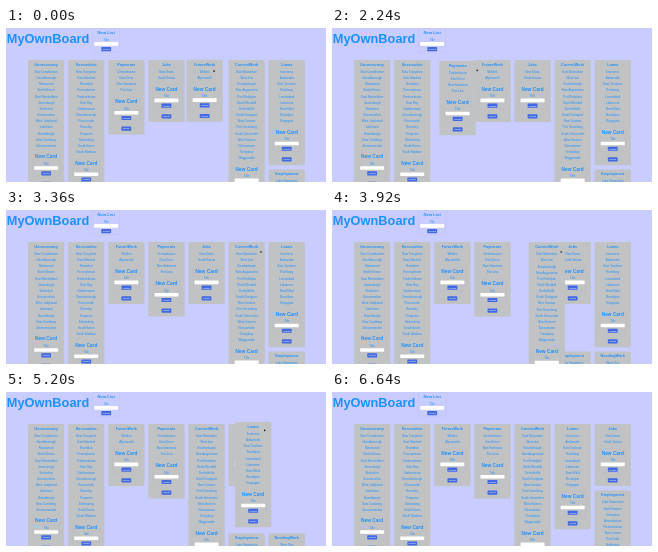
An HTML page with a canvas that plays this animation: 320 px wide and 154 px high, repeating every 8240 ms.

```html
<!DOCTYPE html>
<html lang="en">
<head>
<meta charset="utf-8">
<title>Board</title>
<style>
html, body { margin: 0; width: 100%; height: 100%; overflow: hidden; background: #c8ccff; }
canvas { display: block; width: 100vw; height: 100vh; }
</style>
</head>
<body>
<canvas id="stage"></canvas>
<script>
const W = 320, H = 154, LOOP = 8240, STEP = 80;
const PAGE = '#c8ccff', BLUE = '#1e90ff', GREY = '#c1c2c3', BUTTON = '#4169e1';
const EDGE = 'rgba(182, 186, 205, 0.6)';
const COLS = 7, LEFT = 22, TOP = 32, PITCH = 40.1, LIST_W = 36.3, GAP = 4.3, ROW = 6.15;

const canvas = document.getElementById('stage');
const ctx = canvas.getContext('2d');

const lists = {
  Unnecessary: 'New Constbottom,Haroldborough,Mariewood,North Elmore,East Reinholdton,Jamesburgh,Stokesfort,Uricastershire,West Judykstad,Lakehurst,Brandtburgh,New Carolberg,Zimmermanfurt',
  Necessities: 'New Tracyshire,East Manfred,Rositafurt,Feeneyhaven,Fredericktown,New Ray,Gaitherstown,Dessieborough,Roscoeside,Boverley,Tempeton,Stokesberg,South Karen,South Madison',
  Payments: 'Cristianhaven,East Deon,New Swintonia,Port Lisa',
  Jobs: 'New Dasia,South Karina',
  FutureWork: 'Weldon,Alyceworth',
  CurrentWork: 'East Marionburi,West Isai,Eusebioburgh,New Augustview,Port Rodolpho,North Wendall,Gerholdville,South Dustyport,New Gustave,Port Greenberg,South Vernicefort,West Kareem,Nienowtown,Trinitybury,Waggonside',
  Loans: 'Inverness,Amberside,East Torshavn,Rochberg,Lavinialand,Lakemore,New Kilkid,Brooklynn,Kingsgate',
  Employment: 'Lake Nasarstein,East Grayson,Johnnyton,Amandashire,Frederichaven,New Lenora,Port Estel,Hallieview,Marksbury',
  NeedingWork: 'West Orin,Kaydenport,Lake Elsa,Ricoton'
};
for (const name in lists) lists[name] = lists[name].split(',');

// Each drag: grab point inside the list, and the moment it takes its new slot.
const drags = [
  { name: 'FutureWork', from: 0, swap: 1040, to: 1760, ox: 27, oy: 10, slot: 3 },
  { name: 'Payments', from: 2160, swap: 2480, to: 2880, ox: 37.2, oy: 8.2, slot: 3 },
  { name: 'CurrentWork', from: 3440, swap: 3920, to: 4480, ox: 32, oy: 8.3, slot: 4 },
  { name: 'Loans', from: 4960, swap: 5360, to: 5840, ox: 29, oy: 7, slot: 5 }
];

const path = [
  [0, 207.5, 41.7], [1120, 146, 39.5], [1680, 143, 41], [2000, 138, 40], [2080, 138, 40],
  [2240, 144.7, 41], [2800, 182, 42], [3360, 254.5, 40.5], [4400, 206.5, 40.5],
  [4720, 294, 39.5], [4800, 295, 39.5], [4880, 295, 39.5], [5200, 258, 37],
  [5840, 246, 37.5], [6000, 246, 37.5], [6240, 277, 100], [LOOP, 277, 100]
];

function cursorAt(t) {
  const i = path.findIndex(p => p[0] > t);
  const [t0, x0, y0] = path[i - 1], [t1, x1, y1] = path[i];
  const k = (t - t0) / (t1 - t0);
  return [x0 + (x1 - x0) * k, y0 + (y1 - y0) * k];
}

function orderAt(t) {
  const order = Object.keys(lists);
  for (const d of drags) {
    if (t < d.swap) break;
    order.splice(order.indexOf(d.name), 1);
    order.splice(d.slot, 0, d.name);
  }
  return order;
}

const heightOf = name => 49.8 + ROW * lists[name].length;

// Left floats: a list goes right of every list still open at its height.
function layout(order) {
  const placed = [];
  let y = TOP;
  for (const name of order) {
    let col;
    for (;;) {
      const open = placed.filter(p => p.end > y + 0.01);
      col = Math.max(-1, ...open.map(p => p.col)) + 1;
      if (col < COLS) break;
      y = Math.min(...open.map(p => p.end));
    }
    placed.push({ name, col, x: LEFT + col * PITCH, y, end: y + heightOf(name) + GAP });
  }
  return placed;
}

function text(str, x, baseline, size, color = BLUE, bold = false, align = 'center') {
  ctx.save();
  ctx.translate(x, baseline);
  ctx.scale(0.1, 0.1);
  ctx.font = `${bold ? 'bold ' : ''}${size * 10}px "Liberation Sans", Arial, sans-serif`;
  ctx.textAlign = align;
  ctx.fillStyle = color;
  ctx.fillText(str, 0, 0);
  ctx.restore();
}

function box(x, y, w, h, fill, r = 0.6) {
  ctx.beginPath();
  ctx.roundRect(x, y, w, h, r);
  ctx.fillStyle = fill;
  ctx.fill();
}

function button(label, cx, cy) {
  box(cx - 4.9, cy - 2.1, 9.8, 4.2, BUTTON);
  text(label, cx, cy + 0.8, 2.4, '#fff');
}

function form(heading, cx, y, size) {
  ctx.beginPath();
  ctx.roundRect(cx - 13.5, y, 27, 24, 1);
  ctx.strokeStyle = EDGE;
  ctx.lineWidth = 0.4;
  ctx.stroke();
  text(heading, cx, y + 6, size, BLUE, true);
  text('Title', cx, y + 12.5, 2.8);
  box(cx - 12, y + 13.8, 24, 3.6, '#fff', 0.4);
  button('Submit', cx, y + 20.9);
}

function list(name, x, y) {
  const cx = x + LIST_W / 2, h = heightOf(name);
  box(x, y, LIST_W, h, GREY, 1);
  text(name, cx, y + 6, 3.8, BLUE, true);
  lists[name].forEach((item, i) => text(item, cx, y + 13 + i * ROW, 2.95));
  form('New Card', cx, y + h - 37.3, 4.8);
  button('Delete', cx, y + h - 5.8);
}

function arrow(x, y) {
  ctx.beginPath();
  ctx.moveTo(x, y);
  ctx.lineTo(x, y + 2.6);
  ctx.lineTo(x + 0.7, y + 2.1);
  ctx.lineTo(x + 1.8, y + 1.9);
  ctx.closePath();
  ctx.fillStyle = '#111';
  ctx.fill();
}

function draw(t) {
  const [x, y] = cursorAt(t);
  const drag = drags.find(d => t >= d.from && t < d.to);
  ctx.fillStyle = PAGE;
  ctx.fillRect(0, 0, W, H);
  text('MyOwnBoard', 0.8, 14.8, 12.8, BLUE, true, 'left');
  form('New List', 100.2, 0.3, 4.2);
  for (const p of layout(orderAt(t))) {
    if (p.y < H && !(drag && drag.name === p.name)) list(p.name, p.x, p.y);
  }
  if (drag) list(drag.name, x - drag.ox, y - drag.oy);
  if (t < 6640) arrow(x, y);
}

function resize() {
  const ratio = window.devicePixelRatio || 1;
  canvas.width = Math.round(innerWidth * ratio);
  canvas.height = Math.round(innerHeight * ratio);
}

function frame() {
  const t = performance.now() % LOOP;
  ctx.setTransform(canvas.width / W, 0, 0, canvas.height / H, 0, 0);
  draw(Math.floor(t / STEP) * STEP);
  requestAnimationFrame(frame);
}

addEventListener('resize', resize);
resize();
frame();
</script>
</body>
</html>
```
